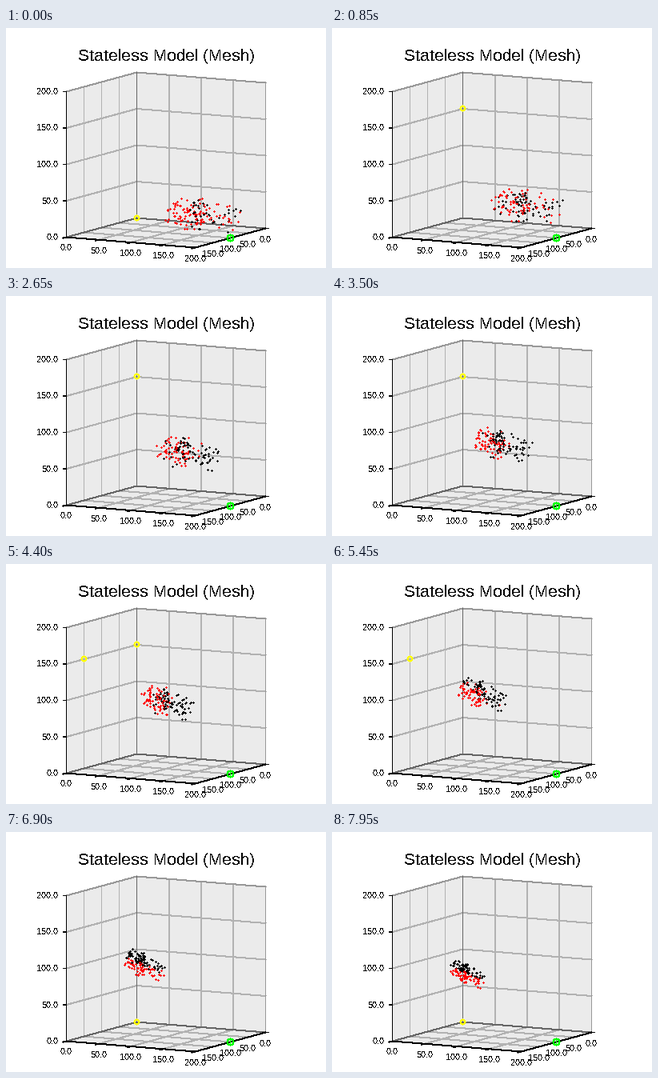
These frames come from a looping animation (400 by 300 pixels, 8000 ms). A matplotlib script:

```python
import numpy as np
import matplotlib.pyplot as plt
from matplotlib.animation import FuncAnimation
from matplotlib.patches import Circle, Polygon

W, H, DPI = 400, 300, 100
STEP, FRAMES = 50, 160
LOOP = STEP * FRAMES / 1000
PX = 72 / DPI
FONT = "Liberation Sans"

plt.rcParams.update({"text.hinting": "native", "text.hinting_factor": 1,
                     "text.antialiased": False})

fig = plt.figure(figsize=(W / DPI, H / DPI), dpi=DPI, facecolor="white")
ax = fig.add_axes([0, 0, 1, 1])
ax.axis("off")

# Projected corner and the three axis vectors of the box
BACK = np.array([163.5, 237.5])
EX = np.array([161.0, 13.0])
EY = np.array([-88.0, 24.0])
EZ = np.array([0.0, -182.0])


def at(x, y, z):
    return BACK + x * EX + y * EY + z * EZ


def line(p, q, color, z=2):
    ax.plot([p[0], q[0]], [p[1], q[1]], color=color, lw=PX, zorder=z,
            solid_capstyle="projecting", antialiased=False, snap=False)


def label(x, y, text, ha="center", size=11):
    ax.text(x, y, text, ha=ha, va="center_baseline", fontsize=size * PX,
            family=FONT, color="black", zorder=6)


def draw_box():
    o, x, y, z = (0, 0, 0), (1, 0, 0), (0, 1, 0), (0, 0, 1)
    xy, xz, yz = (1, 1, 0), (1, 0, 1), (0, 1, 1)
    for face in [(o, y, yz, z), (o, x, xz, z), (o, x, xy, y)]:
        ax.add_patch(Polygon([at(*c) for c in face], fc="#ebebeb", ec="none", zorder=1))

    grid = "#b2b2b2"
    for k in (0.25, 0.5, 0.75):
        line(at(0, k, 0), at(0, k, 1), grid)
        line(at(0, 0, k), at(0, 1, k), grid)
        line(at(k, 0, 0), at(k, 0, 1), grid)
        line(at(0, 0, k), at(1, 0, k), grid)
        line(at(k, 0, 0), at(k, 1, 0), grid)
        line(at(0, k, 0), at(1, k, 0), grid)

    for p, q in [(z, yz), (z, xz), (x, xz)]:
        line(at(*p), at(*q), "#999999")
    for end in (x, y, z):
        line(at(*o), at(*end), "#666666")
    for p, q in [(y, yz), (y, xy), (xy, x)]:
        line(at(*p), at(*q), "black", 3)


def draw_ticks():
    for k in np.linspace(0, 1, 5):
        text = f"{200 * k:.1f}"
        p = at(0, 1, k)
        line(p, p + (-4, 0), "black", 3)
        label(65.5, p[1] - 0.5, text, "right")
        p = at(k, 1, 0)
        line(p, p + (-4, 1), "black", 3)
        label(p[0], p[1] + 13, text)
        p = at(1, k, 0)
        line(p, p + (4, 0), "black", 3)
        label(p[0], p[1] + 13, text)


def ring(x, y, r, color):
    style = dict(color=color, lw=PX, zorder=5, antialiased=False, snap=False)
    parts = [ax.add_patch(Circle((x, y), r, fill=False, **style))]
    for dx, dy in [(1, 0), (-1, 0), (0, 1), (0, -1)]:
        a, b = r - 0.5, r + 1.5
        parts += ax.plot([x + a * dx, x + b * dx], [y + a * dy, y + b * dy],
                         solid_capstyle="butt", **style)
    return parts


draw_box()
draw_ticks()
label(200, 33.5, "Stateless Model (Mesh)", size=21)
ring(280.5, 262.5, 4, "#00ff00")
line((280.5, 259.5), (280.5, 265.5), "#00ff00", 5)

# Each light with the spans of time (s) in which it is on
LIGHTS = [
    (ring(163.5, 237.5, 3, "#ffff00"), [(0, 0.45), (6.4, LOOP)]),
    (ring(163.5, 100.5, 3, "#ffff00"), [(0.45, 4.7)]),
    (ring(97.5, 118.5, 3, "#ffff00"), [(3.85, 6.4)]),
]

# Swarm: a loose cloud, denser towards the left of its middle
N = 150
rng = np.random.default_rng(7)
cloud = rng.normal(0, 0.52, (800, 2))
cloud = cloud[np.hypot(*cloud.T) < 1][:N]
U0 = cloud[:, 0] - 0.2 * (1 - cloud[:, 0] ** 2)
V0 = cloud[:, 1]
PHASE = rng.uniform(0, 2 * np.pi, (3, N))
SPEED = rng.uniform(1.5, 5, (3, N))


def smooth(p):
    p = np.clip(p, 0, 1)
    return p * p * (3 - 2 * p)


def spread(a, mid, half):
    return mid + half * (2 * (a - a.min()) / np.ptp(a) - 1)


layer = np.zeros((H, W, 4), np.uint8)
image = ax.imshow(layer, extent=(0, W, H, 0), interpolation="nearest",
                  aspect="auto", zorder=4)
ax.set_xlim(0, W)
ax.set_ylim(H, 0)

PLUS = [(0, 0), (1, 0), (-1, 0), (0, 1), (0, -1)]
RED, BLACK = (255, 0, 0, 255), (0, 0, 0, 255)


def update(i):
    t = i * STEP / 1000
    p = t / LOOP

    drift = np.sin(PHASE + SPEED * t)
    u = U0 + 0.05 * drift[0]
    v = V0 + 0.06 * drift[1]

    # Glide left, climb at a steady rate, then turn and sink after 6 s
    mid_x = 246 - 77 * smooth(p)
    mid_y = 146 + 14.5 * np.hypot(t - 6, 1)
    tilted = v + (0.1 + 0.5 * p) * u
    xs = np.rint(spread(u, mid_x, 47 - 26 * p)).astype(int)
    ys = np.rint(spread(tilted, mid_y, 21 - 4 * p ** 8)).astype(int)

    # The side facing the light is red: first the left, later the bottom
    turn = smooth((t - 4.5) / 2)
    mix = 0.06 + (1 - p) ** 1.5
    score = turn * v - (1 - turn) * u + mix * np.sin(PHASE[2] + t / 2.5)
    share = 0.46 + 0.28 * np.exp(-2 * t)
    red = score > np.quantile(score, 1 - share)

    layer = np.zeros((H, W, 4), np.uint8)
    for x, y, c in zip(xs, ys, np.where(red[:, None], RED, BLACK)):
        for dx, dy in PLUS:
            layer[y + dy, x + dx] = c
    image.set_data(layer)

    for parts, spans in LIGHTS:
        on = any(a <= t < b for a, b in spans)
        for part in parts:
            part.set_visible(on)
    return [image]


anim = FuncAnimation(fig, update, frames=FRAMES, interval=STEP, repeat=True,
                     repeat_delay=0, blit=False)
plt.show()
```
